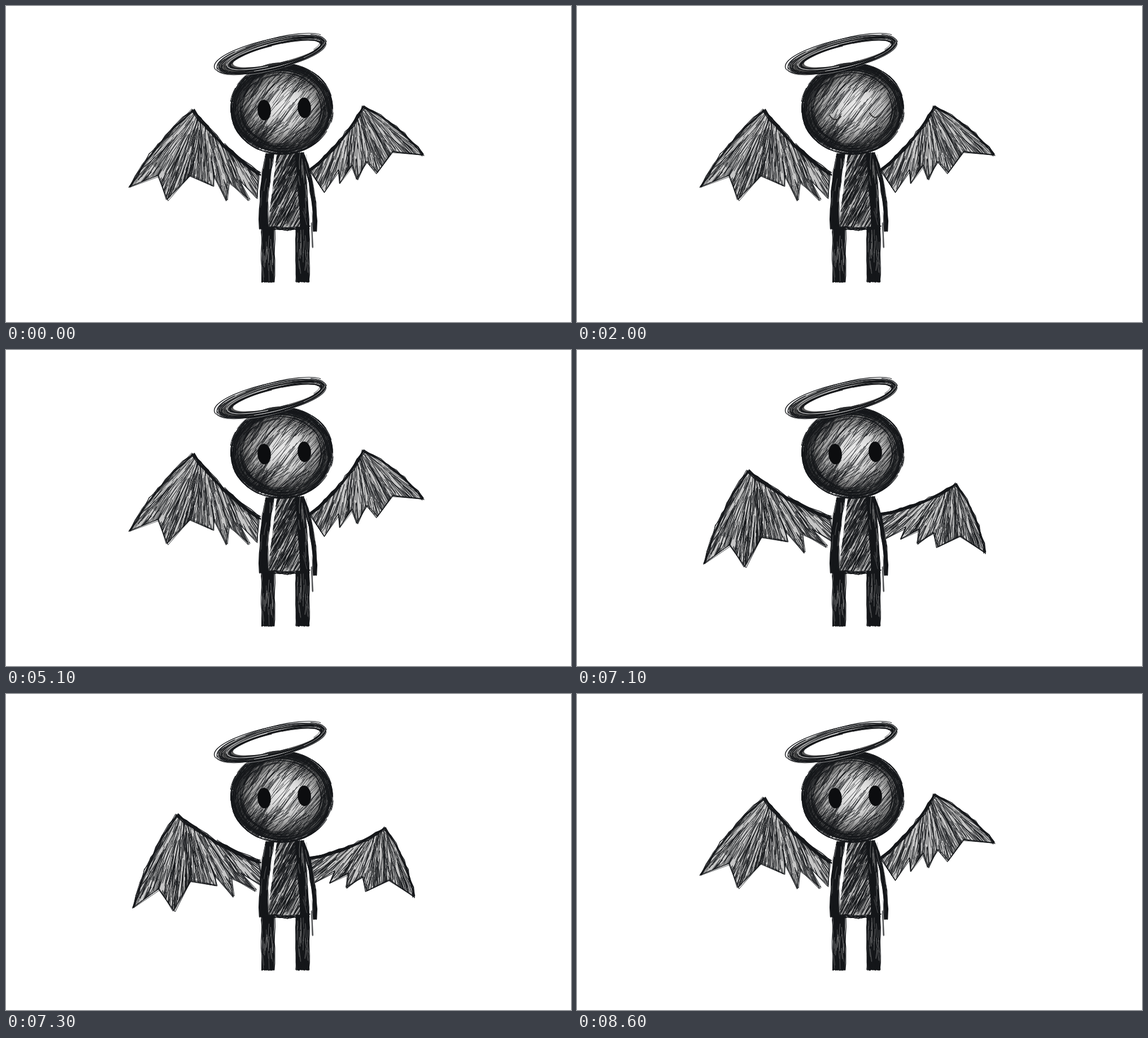
Animation of 1000x560 px, one loop 9400 ms. Source, as an HTML page with a canvas:

```html
<!DOCTYPE html>
<html>
<head>
<meta charset="utf-8">
<style>
  html, body { margin: 0; width: 100%; height: 100%; overflow: hidden; background: #fff; }
  canvas { display: block; }
</style>
</head>
<body>
<canvas id="stage" width="1000" height="560"></canvas>
<script>
const ctx = document.getElementById('stage').getContext('2d');
const INK = '#15171a';
const LOOP = 9400;
const TAU = Math.PI * 2;
const rad = degrees => degrees * Math.PI / 180;
const lerp = (a, b, t) => a + (b - a) * t;
const mix = (p, q, t) => [lerp(p[0], q[0], t), lerp(p[1], q[1], t)];

let seed = 1;
function random() {
  seed = seed + 0x6D2B79F5 | 0;
  let t = Math.imul(seed ^ seed >>> 15, 1 | seed);
  t = t + Math.imul(t ^ t >>> 7, 61 | t) ^ t;
  return ((t ^ t >>> 14) >>> 0) / 4294967296;
}
const between = (a, b) => lerp(a, b, random());
const jitter = amount => between(-amount, amount);

// Points of a shallow arc from a to b, bulging sideways by bend
function curve(a, b, bend) {
  const dx = b[0] - a[0], dy = b[1] - a[1], length = Math.hypot(dx, dy);
  return Array.from({ length: 9 }, (_, i) => {
    const t = i / 8, [x, y] = mix(a, b, t), push = bend * 4 * t * (1 - t) / length;
    return [x + dy * push, y - dx * push];
  });
}

function trace(points, spread = 0, shift = 0) {
  ctx.beginPath();
  for (const [x, y] of points) ctx.lineTo(x + shift + jitter(spread), y + jitter(spread));
}

function stroke(width, color = INK) {
  ctx.lineWidth = width;
  ctx.strokeStyle = color;
  ctx.stroke();
}

// Repeated loose pen strokes along one line
function sketch(points, passes, spread, width) {
  for (let i = 0; i < passes; i++) {
    trace(points, spread);
    stroke(width * between(.6, 1.3));
  }
}

// Random strokes in a box; direction maps a position to an angle
function hatch(count, [left, top, right, bottom], direction, length, width, color) {
  for (let i = 0; i < count; i++) {
    const x = between(left, right), y = between(top, bottom);
    const angle = direction(x, y) + jitter(.12), half = length * between(.3, .6);
    const dx = Math.cos(angle) * half, dy = Math.sin(angle) * half;
    ctx.beginPath();
    ctx.moveTo(x - dx, y - dy);
    ctx.quadraticCurveTo(x + jitter(2), y + jitter(2), x + dx, y + dy);
    stroke(width * between(.6, 1.3), color);
  }
}
const slanted = degrees => () => rad(-degrees);

function clipped(draw) {
  ctx.save();
  ctx.clip();
  draw();
  ctx.restore();
}

function ellipse(x, y, rx, ry, tilt = 0, start = 0, end = TAU) {
  ctx.ellipse(x, y, rx, ry, rad(tilt), start, end);
}

const wings = [
  { side: 1, root: [448, 297], apex: [331, 184], drop: -14.2, stretch: 1.03,
    tips: [[219, 320], [285, 344], [366, 320], [391, 346], [430, 344], [443, 340]] },
  { side: -1, root: [538, 292], apex: [633, 179], drop: 28, stretch: .97,
    tips: [[738, 264], [657, 296], [622, 308], [591, 313], [562, 330]] }
];

// A notch between neighbouring feather tips is their middle, pulled towards the apex
function featherEdge(tips, apex, root) {
  const edge = tips.flatMap((tip, i) =>
    i ? [mix(mix(tips[i - 1], tip, .5), apex, .21), tip] : [tip]);
  return [...edge, root];
}

function drawWing({ side, root, apex, drop, stretch, tips }, lowered) {
  seed = 30 + side;
  ctx.save();
  ctx.translate(...root);
  if (lowered) {
    ctx.rotate(rad(drop));
    ctx.scale(stretch, stretch);
  }
  ctx.translate(-root[0], -root[1]);

  const leading = curve(tips[0], apex, 8 * side);
  const arm = curve(apex, root, -7 * side);
  const feathers = featherEdge(tips, apex, root);
  const focus = mix(apex, root, .15);
  const left = Math.min(root[0], tips[0][0]), right = Math.max(root[0], tips[0][0]);

  trace([...leading, ...arm, ...feathers.slice().reverse()]);
  ctx.fillStyle = '#c6c6c6';
  ctx.fill();
  clipped(() => hatch((right - left) * 3.3, [left, apex[1], right, 346],
    (x, y) => Math.atan2(y - focus[1] + 30, x - focus[0]), 46, .85));
  sketch(feathers, 4, 2.2, .8);
  sketch(leading, 7, 2.6, 1.1);
  sketch(arm, 13, 3, 1.3);
  sketch(arm.slice(4), 6, 2.6, 1.6);
  ctx.restore();
}

// Solid core, loose edges and a few pale flecks
function limb(from, to, bend, width) {
  const line = curve(from, to, bend);
  trace(line);
  ctx.lineCap = 'butt';
  stroke(width - 3);
  ctx.lineCap = 'round';
  for (let i = 0; i < width * 1.4; i++) {
    trace(line, .9, jitter(width / 2));
    stroke(1.2);
  }
  const reach = width / 2 - 2;
  const lean = Math.atan2(to[1] - from[1], to[0] - from[0]);
  hatch(width * .8, [Math.min(from[0], to[0]) - reach, from[1] + 15, Math.max(from[0], to[0]) + reach, to[1] - 15],
    () => lean, 24, .55, '#999');
}

function drawBody() {
  seed = 37;
  for (const x of [464, 525]) limb([x, 388], [x, 489], 0, 24);
  trace([[480, 258], [512, 258], [523, 392], [463, 392]]);
  ctx.fillStyle = '#b0b0b0';
  ctx.fill();
  clipped(() => hatch(270, [462, 256, 524, 392], slanted(62), 38, 1.05));
  limb([467, 262], [456, 395], -4, 17);
  limb([519, 260], [529, 395], 1, 16);
  limb([526, 264], [547, 399], 6, 8);
  sketch(curve([455, 392], [536, 392], -3), 9, 3.5, 1.4);
  sketch([[541, 385], [543, 428]], 3, 1.5, .6);
}

function drawHead() {
  seed = 53;
  const x = 488, y = 182.5, rx = 89, ry = 79;
  ctx.save();
  ctx.translate(x, y);
  ctx.scale(1, ry / rx);
  const shade = ctx.createRadialGradient(10, -8, 8, 0, 0, rx);
  ['#e8e8e8', '#dadada', '#b8b8b8', '#777', '#1c1e20'].forEach((tone, i) => shade.addColorStop(i / 4, tone));
  ctx.fillStyle = shade;
  ctx.beginPath();
  ctx.arc(0, 0, rx - 2, 0, TAU);
  ctx.fill();
  ctx.restore();

  ctx.beginPath();
  ellipse(x, y, rx, ry);
  clipped(() => {
    hatch(270, [400, 103, 577, 262], slanted(50), 56, .75);
    hatch(110, [400, 110, 465, 250], slanted(60), 40, .75);
    hatch(80, [480, 105, 565, 145], slanted(36), 30, .75);
    hatch(100, [415, 212, 555, 262], slanted(36), 34, .8);
  });
  for (let i = 0; i < 330; i++) {
    const size = 1.015 - .24 * random() ** 1.9, start = between(0, TAU);
    ctx.beginPath();
    ellipse(x + jitter(2), y + jitter(2), rx * size, ry * size, jitter(6), start, start + between(.2, .9));
    stroke(between(.6, 1.3));
  }
}

function drawHalo() {
  seed = 71;
  ctx.fillStyle = '#555';
  ctx.beginPath();
  ellipse(470, 86, 97, 24, -14);
  ctx.closePath();
  ctx.moveTo(555, 67);
  ellipse(479, 85, 79, 16, -13);
  ctx.fill('evenodd');
  for (let i = 0; i < 52; i++) {
    const t = random(), start = between(0, TAU);
    ctx.beginPath();
    ellipse(lerp(469, 478, t) + jitter(1.5), 86 + jitter(1.5), lerp(102, 80, t), lerp(27, 16, t),
      -14 + jitter(1.5), start, start + between(1.2, 4.5));
    stroke(between(.6, 1.4), i % 7 ? INK : '#ccc');
  }
}

function drawEyes(closed) {
  for (const [x, y] of [[457, 184.5], [528, 180.5]]) {
    ctx.beginPath();
    if (closed) {
      ctx.moveTo(x - 10, y + 9);
      ctx.quadraticCurveTo(x - 1, y + 24, x + 10, y + 11);
      stroke(2, '#333');
    } else {
      ellipse(x, y, 11.8, 18.3, -3);
      ctx.fillStyle = '#0c0d0f';
      ctx.fill();
    }
  }
}

function drawScene(lowered, closed) {
  ctx.fillStyle = '#fff';
  ctx.fillRect(0, 0, 1000, 560);
  ctx.lineCap = ctx.lineJoin = 'round';
  for (const wing of wings) drawWing(wing, lowered);
  drawBody();
  drawHead();
  drawHalo();
  drawEyes(closed);
}

let shown = '';
const origin = performance.now();
function tick() {
  const time = (performance.now() - origin) % LOOP;
  const during = start => time >= start && time < start + 100;
  const closed = during(2000);
  const lowered = during(7100) || during(7300);
  const pose = `${lowered} ${closed}`;
  if (pose !== shown) drawScene(lowered, closed);
  shown = pose;
  requestAnimationFrame(tick);
}
tick();
</script>
</body>
</html>
```
